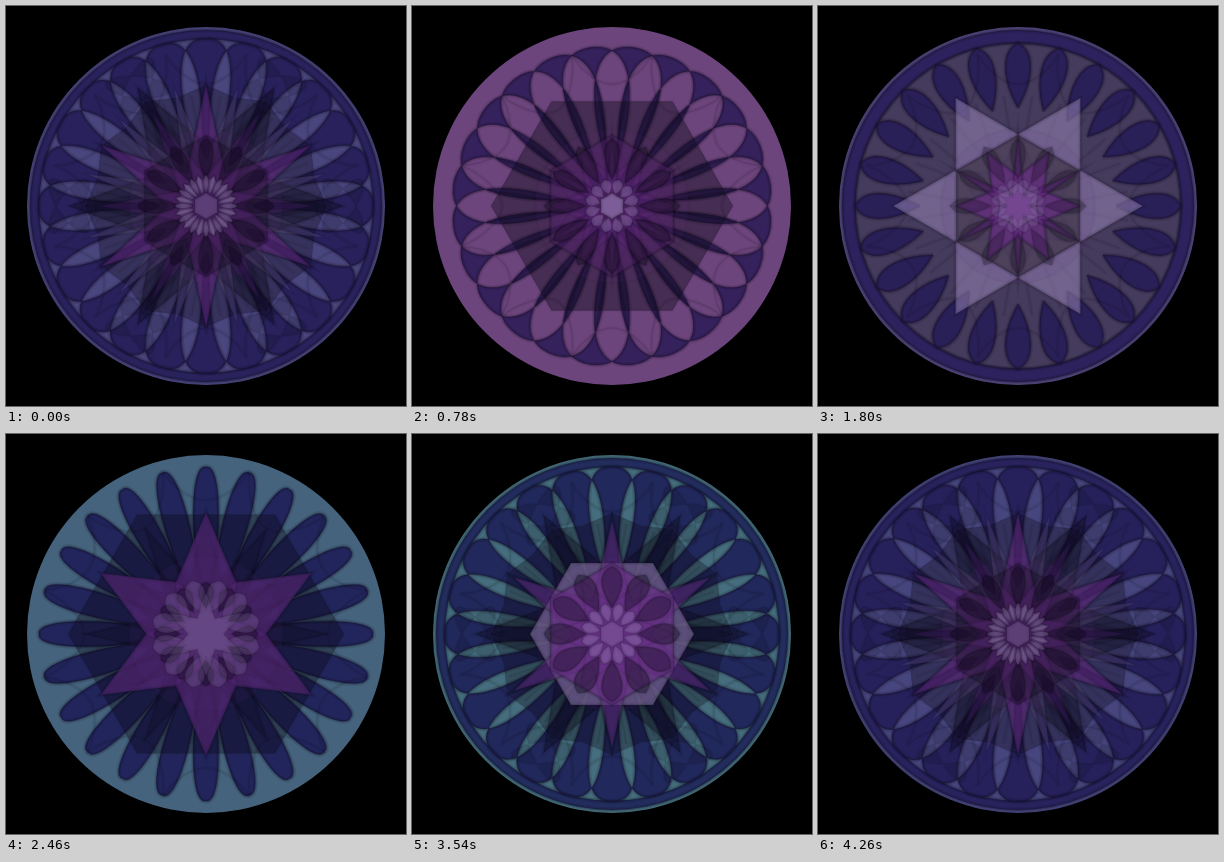
An HTML page with a canvas for the animation above (4.32 s loop, 400 by 400 pixels).

```html
<!DOCTYPE html>
<html lang="en">
<head>
<meta charset="utf-8">
<title>Mandala</title>
<style>
  html, body { margin: 0; width: 100%; height: 100%; overflow: hidden; background: #000; }
  canvas { display: block; width: 400px; height: 400px; }
</style>
</head>
<body>
<canvas id="stage" width="400" height="400"></canvas>
<script>
const ctx = document.getElementById('stage').getContext('2d');
const TAU = Math.PI * 2, LOOP = 4320, STEP = 60;
const BLACK = 'rgb(10 8 20)', GREY = 'rgb(62 54 72)';
const PURPLE = 'rgb(106 44 136)', LILAC = 'rgb(150 132 180)';

// Moments of the loop at which each pattern is fully open:
// lattice, lens, tear, oars, pool, crown.
const MOMENTS = [0, .181, .417, .569, .681, .819];

// Eased weight of every pattern; the weights always add up to 1.
function blend(u) {
  const n = MOMENTS.length, weights = MOMENTS.map(() => 0);
  const i = MOMENTS.findLastIndex(m => m <= u);
  const end = MOMENTS[i + 1] ?? 1;
  const p = (u - MOMENTS[i]) / (end - MOMENTS[i]);
  const mix = (1 - Math.cos(p * Math.PI)) / 2;
  weights[i] = 1 - mix;
  weights[(i + 1) % n] = mix;
  return weights;
}

function softEdge(path, alpha) {
  ctx.strokeStyle = BLACK;
  for (const width of [5, 2.5, 1]) {
    ctx.globalAlpha = alpha * .25 / Math.sqrt(width);
    ctx.lineWidth = width;
    ctx.stroke(path);
  }
}

function paint(path, color, alpha, edge = alpha) {
  if (alpha < .005) return;
  ctx.globalAlpha = alpha;
  ctx.fillStyle = color;
  ctx.fill(path, 'evenodd');
  softEdge(path, edge);
}

// n copies of a shape turned around the centre.
function ring(n, turn, shape) {
  const all = new Path2D();
  for (let i = 0; i < n; i++) {
    all.addPath(shape, new DOMMatrix().rotate(turn + i * 360 / n));
  }
  return all;
}

// Overlapping petals cancel out; low and high place the curve handles.
function petals(n, turn, foot, tip, w, low = .5, high = 1) {
  const y1 = -foot - (tip - foot) * low, y2 = -foot - (tip - foot) * high;
  const p = new Path2D();
  p.moveTo(0, -foot);
  p.bezierCurveTo(w, y1, w, y2, 0, -tip);
  p.bezierCurveTo(-w, y2, -w, y1, 0, -foot);
  return ring(n, turn, p);
}

function star(n, turn, outer, inner) {
  const p = new Path2D();
  for (let i = 0; i < n * 2; i++) {
    const a = (turn / 360 + i / (n * 2)) * TAU, r = i % 2 ? inner : outer;
    p.lineTo(r * Math.sin(a), -r * Math.cos(a));
  }
  p.closePath();
  return p;
}

const hexagon = (turn, r) => star(6, turn, r, r * Math.cos(TAU / 12));

function disc(r) {
  const p = new Path2D();
  p.arc(0, 0, r, 0, TAU);
  return p;
}

function band(inner, outer) {
  const p = disc(outer);
  p.addPath(disc(inner));
  return p;
}

function blades(length) {
  const p = new Path2D();
  for (const turn of [-35, 35]) {
    const blade = new Path2D();
    blade.ellipse(0, 0, length, 11, 0, 0, TAU);
    p.addPath(blade, new DOMMatrix().translate(0, -137).rotate(turn));
  }
  return ring(6, 30, p);
}

function curl(r, swing, loop) {
  const p = new Path2D();
  for (let a = 0; a < TAU; a += TAU / 720) {
    const d = r - swing * Math.cos(12 * a) + 6 * Math.cos(6 * a);
    const b = a + loop * Math.sin(12 * a);
    p.lineTo(d * Math.sin(b), -d * Math.cos(b));
  }
  p.closePath();
  return p;
}

function spokes(r) {
  const p = new Path2D();
  for (const side of [-1, 1]) {
    p.moveTo(0, -28);
    p.lineTo(side * r * .13, -r);
  }
  return ring(12, 0, p);
}

function pins(r) {
  const p = new Path2D();
  p.ellipse(0, -r, 4, 5, 0, 0, TAU);
  return ring(24, 0, p);
}

function drawRim(u, navy, [lattice, lens, tear, oars, pool, crown]) {
  const tint = Math.sin(TAU * (u + .03));
  const base = `hsl(${236 + 48 * tint} 29% 38%)`;
  ctx.globalAlpha = 1;
  ctx.fillStyle = base;
  ctx.fill(disc(179));
  paint(disc(163), GREY, .6 * tear);
  paint(band(167 - 4 * tear, 176), navy, .85 * (lattice + tear + crown));
}

function drawPetals(navy, [lattice, lens, tear, oars, pool, crown]) {
  const wide = lattice + crown;
  const foot = 22 + 76 * tear + 16 * crown;
  const tip = 167 - 4 * tear - 39 * pool;
  const width = 17 + 16 * lattice + 14 * crown - 12 * pool;
  paint(petals(24, 0, foot, tip, width, .45 + .17 * wide, 1.03 - .13 * tear), navy, .9 * (1 - lens));
  paint(petals(24, 7.5, 20, 160, 44, .6), navy, .9 * lens);
  softEdge(curl(136 + 12 * (oars + pool), 20, .08 + .12 * pool), .3 + .5 * pool);

  const edge = 110 + 4 * pool;
  paint(disc(edge), navy, .92 * pool);
  paint(pins(edge + 8), navy, .92 * pool);
}

function drawShade([lattice, lens, tear, oars, pool, crown]) {
  const sharp = lattice + crown;
  paint(star(12, 0, 121, 112), BLACK, .3 * sharp, .1 * sharp);
  paint(blades(32 + 10 * pool), BLACK, .34 * pool + .15 * sharp);
  paint(star(6, 30, 137, 62), BLACK, .36 * sharp);
  paint(hexagon(30, 138 - 17 * lens), BLACK, .4 * lens + .34 * oars, .12);
  paint(star(12, 0, 122, 58), BLACK, .15 * sharp + .25 * oars);
  paint(star(12, 15, 122, 45), LILAC, .18 * lattice);
  softEdge(spokes(110 + 15 * lens), .25 + .35 * lens);
}

function drawStars([lattice, lens, tear, oars, pool, crown]) {
  const spike = lattice + oars + .85 * (pool + crown);
  paint(star(6, 30, 125, 72), LILAC, .55 * tear);
  paint(star(6, 30, 82, 71), LILAC, .55 * crown);
  paint(disc(77), PURPLE, .5 * pool + .08);
  paint(star(6, 0, 68 + 54 * Math.min(spike, 1), 38 + 22 * oars + 8 * pool), PURPLE, .2 + .3 * spike);

  const cell = hexagon(0, 71);
  paint(cell, GREY, .7 * tear);
  paint(cell, BLACK, .3 * lattice + .2 * lens);
  paint(cell, PURPLE, .35 * lens + .6 * crown);
  paint(star(6, 30, 62 + 45 * lattice, 30), PURPLE, .2 + .45 * tear);
  paint(star(6, 0, 70, 12), PURPLE, .6 * tear + .3 * lens);
}

function drawHeart(u, [lattice, lens, tear, oars, pool, crown]) {
  const open = oars + pool, pulse = Math.sin(TAU * 4 * u);
  paint(petals(12, 0, 26, 68 - 16 * open, 10 + 4 * crown, .5, .85), BLACK, .36 - .12 * tear);
  paint(petals(12, 15, 12 + 11 * open, 29 + 24 * open + 2 * pulse, 7 + 6 * open, .5, .85),
    LILAC, .22 + .14 * (lens + crown));
  paint(petals(24, 0, 13, 31, 3, .5, .9), LILAC, .4 * lattice);
  paint(star(6, 0, 13 + 10 * tear + 29 * open, 11 + 7 * (open + tear)), LILAC,
    .28 + .3 * lens + .1 * pool);
}

function draw(u) {
  const weights = blend(u);
  const navy = `hsl(${246 + 12 * Math.sin(TAU * (u + .03))} 50% 23%)`;
  ctx.setTransform(1, 0, 0, 1, 0, 0);
  ctx.globalAlpha = 1;
  ctx.fillStyle = '#000';
  ctx.fillRect(0, 0, 400, 400);
  ctx.translate(200, 200);
  drawRim(u, navy, weights);
  drawPetals(navy, weights);
  drawShade(weights);
  drawStars(weights);
  drawHeart(u, weights);
}

const start = performance.now();

function tick() {
  const t = (performance.now() - start) % LOOP;
  draw(Math.floor(t / STEP) * STEP / LOOP);
  requestAnimationFrame(tick);
}
tick();
</script>
</body>
</html>
```
